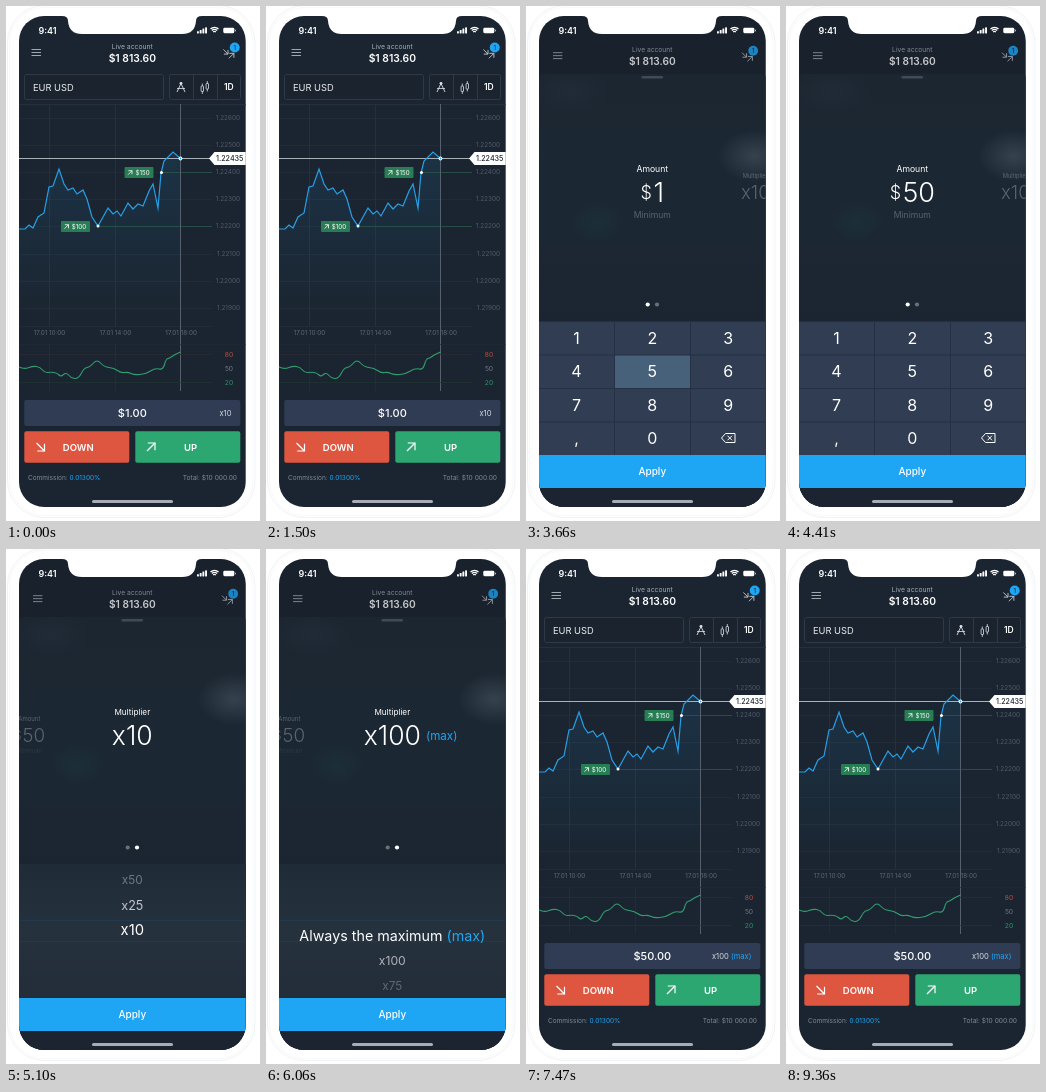
These frames come from a looping animation (254 by 515 pixels, 9.39 s). An HTML page with a canvas:

```html
<!DOCTYPE html>
<html lang="en">
<head>
<meta charset="utf-8">
<style>
html, body { margin: 0; width: 100%; height: 100%; overflow: hidden; background: #fff; }
canvas { display: block; width: 254px; height: 515px; }
</style>
</head>
<body>
<canvas id="stage"></canvas>
<script>
const LOOP = 9390, W = 254, H = 515, MID = 126.3;
const BLUE = '#1ea6f4', GREEN = '#2ca771', RED = '#de563f', GREY = '#7f8994', DIM = '#505b67';
const canvas = document.getElementById('stage');
const g = canvas.getContext('2d');
const ratio = window.devicePixelRatio || 1;
canvas.width = W * ratio;
canvas.height = H * ratio;

const PRICES = [[13,223],[19,223],[23,219],[27,222],[32,211],[38,207],[43,181],[47,180],[53,163],
  [58,178],[62,184],[67,182],[71,188],[77,184],[81,193],[86,211],[92,220],[97,211],[102,202],[107,208],
  [111,205],[115,210],[122,197],[127,203],[132,198],[137,200],[143,185],[147,178],[152,202],[155,167],
  [158,155],[167,146],[174.5,152.5]];
const WAVE = [[13,361],[19,363],[27,360],[34,361],[39,367],[45,366],[51,367],[55,371],[60,366],[66,373],
  [73,372],[78,362],[84,361],[91,353],[98,361],[108,362],[115,367],[122,366],[128,369],[140,368],[149,362],
  [157,364],[160,353],[164,352],[168,349],[174.5,346]];
const KEYS = ['1', '2', '3', '4', '5', '6', '7', '8', '9', ',', '0', ''];
const STEPS = ['x10', 'x25', 'x50', 'x75', 'x100', 'Always the maximum'];

const span = (t, a, b) => Math.min(1, Math.max(0, (t - a) / (b - a)));
const smooth = u => u * u * (3 - 2 * u);
const easeOut = u => 1 - (1 - u) ** 3;

function text(s, x, y, size, color = '#fff', weight = 400, align = 'center') {
  g.font = `${weight} ${size}px Inter, Roboto, sans-serif`;
  g.fillStyle = color;
  g.textAlign = align;
  g.textBaseline = 'alphabetic';
  g.fillText(s, x, y + size * 0.36);
  return g.measureText(s).width;
}

// Two-coloured run; x is the start, centre or end according to align.
function pair(a, b, x, y, size, colors, align = 'left', weight = 400) {
  g.font = `${weight} ${size}px Inter, Roboto, sans-serif`;
  const total = g.measureText(a + b).width;
  const left = x - total * { left: 0, center: 0.5, right: 1 }[align];
  const w = text(a, left, y, size, colors[0], weight, 'left');
  text(b, left + w, y, size, colors[1], weight, 'left');
}

function box(x, y, w, h, r, fill, stroke, width = 1) {
  g.beginPath();
  g.roundRect(x, y, w, h, r);
  if (fill) { g.fillStyle = fill; g.fill(); }
  if (stroke) { g.strokeStyle = stroke; g.lineWidth = width; g.stroke(); }
}

function dot(x, y, r, fill) {
  g.beginPath();
  g.arc(x, y, r, 0, 7);
  g.fillStyle = fill;
  g.fill();
}

function line(points, color, width = 1) {
  g.beginPath();
  points.forEach(([x, y]) => g.lineTo(x, y));
  g.strokeStyle = color;
  g.lineWidth = width;
  g.stroke();
}

function curve(points, color, width) {
  g.beginPath();
  g.moveTo(...points[0]);
  points.slice(1).forEach(([x, y], i) => {
    const [px, py] = points[i];
    g.quadraticCurveTo(px, py, (px + x) / 2, (py + y) / 2);
  });
  g.lineTo(...points.at(-1));
  g.strokeStyle = color;
  g.lineWidth = width;
  g.stroke();
}

// Diagonal arrow to the right with a wide corner head.
function arrow(x, y, size, down, color = '#fff', width = 1) {
  const s = down ? 1 : -1, h = size / 2;
  line([[x - h, y - s * h], [x + h, y + s * h]], color, width);
  line([[x + h, y - s * h * 0.8], [x + h, y + s * h], [x - h * 0.8, y + s * h]], color, width);
}

function header() {
  for (const y of [43.5, 46.5, 49.5]) line([[25.5, y], [35, y]], '#aeb6be', 0.9);
  text('Live account', MID, 40.5, 6.8, '#a4adb6');
  text('$1 813.60', MID, 52, 10.3, '#fff', 600);
  arrow(219.7, 45.8, 4.6, true, '#c8ced4', 0.9);
  arrow(225.4, 49.8, 5, false, '#c8ced4', 0.9);
  dot(228.7, 41.5, 5, BLUE);
  text('1', 228.7, 41.5, 6, '#12314a', 500);
}

function toolbar() {
  const edge = '#303a46', ink = '#dfe3e7';
  box(18.5, 68.5, 139, 25, 2, '#1a232e', edge);
  text('EUR USD', 27, 81.3, 9.3, '#e8ebee', 400, 'left');
  box(163.5, 68.5, 71, 25, 2, '#1a232e', edge);
  for (const x of [187.5, 211.5]) line([[x, 69], [x, 93]], edge);
  dot(175, 77.3, 1.4, ink);
  line([[171, 86], [175, 77.5], [179, 86]], ink, 0.9);
  line([[171, 82.5], [179, 82.5]], ink, 0.8);
  for (const [x, y] of [[196.3, 80], [201.3, 77.5]]) {
    box(x - 1.2, y, 2.4, 5.5, 0.5, null, ink, 0.8);
    line([[x, y - 2.5], [x, y]], ink, 0.8);
    line([[x, y + 5.5], [x, y + 8]], ink, 0.8);
  }
  text('1D', 222.8, 81.3, 8.5, '#fff', 600);
}

function deal(x, y, label) {
  box(x, y, 29, 11, 1, '#287d54');
  arrow(x + 5.5, y + 5.7, 4, false, '#fff', 0.8);
  text(label, x + 18, y + 5.6, 6.2);
}

function chart() {
  const grid = '#26303b';
  line([[13, 98.5], [240, 98.5]], grid);
  for (let i = 0; i < 8; i++) {
    const y = Math.round(112 + i * 27.1) + 0.5;
    line([[13, y], [206, y]], grid, 0.7);
    text((1.226 - i * 0.001).toFixed(5), 234, y - 0.5, 6.4, DIM, 400, 'right');
  }
  for (const x of [43.5, 109.5]) line([[x, 98], [x, 320]], grid);
  line([[13, 320.5], [206, 320.5]], grid, 0.7);

  const shade = g.createLinearGradient(0, 145, 0, 310);
  shade.addColorStop(0, 'rgba(30,130,190,.15)');
  shade.addColorStop(1, 'rgba(30,130,190,0)');
  g.beginPath();
  [...PRICES, [174.5, 320], [13, 320]].forEach(([x, y]) => g.lineTo(x, y));
  g.fillStyle = shade;
  g.fill();

  line([[92, 220.5], [206, 220.5]], '#28594a', 0.8);
  line([[155, 166.5], [206, 166.5]], '#28594a', 0.8);
  line([[174.5, 98], [174.5, 385]], '#56606c');
  line([[13, 152.5], [205, 152.5]], '#a9b1b9');
  line(PRICES, '#269fe7', 1.2);
  for (const [x, y] of [[92, 220], [155.5, 166.5]]) dot(x, y, 1.5, '#fff');
  dot(174.5, 152.5, 1.9, '#fff');
  dot(174.5, 152.5, 0.9, BLUE);
  deal(55, 215, '$100');
  deal(118.5, 161, '$150');

  g.beginPath();
  [[203, 152.5], [208.5, 146], [240, 146], [240, 159], [208.5, 159]].forEach(p => g.lineTo(...p));
  g.fillStyle = '#fff';
  g.fill();
  text('1.22435', 223.7, 152.7, 7.2, '#1b2531', 500);

  [10, 14, 18].forEach((h, i) => text(`17.01 ${h}:00`, 43.5 + i * 65.8, 327, 6.3, '#5c6773'));
  line([[13, 338.5], [240, 338.5]], '#202a35', 0.7);
  for (const x of [43.5, 109.5]) line([[x, 338], [x, 385]], grid, 0.7);
  line([[13, 348.5], [206, 348.5]], '#302b33', 0.7);
  line([[13, 376.5], [206, 376.5]], '#20352f', 0.7);
  curve(WAVE, '#2f9e6c', 1.1);
  text('80', 223, 348.5, 6.7, '#b94d40');
  text('50', 223, 362.3, 6.7, '#707b86');
  text('20', 223, 376.3, 6.7, '#2c9467');
}

function home(done) {
  header();
  toolbar();
  chart();
  box(18.3, 394, 216, 26, 2, '#303c53');
  text(done ? '$50.00' : '$1.00', MID, 407.2, 11, '#fff', 500);
  pair(done ? 'x100 ' : 'x10', done ? '(max)' : '', 225.5, 407, 7.6, ['#d6dbe1', BLUE], 'right');
  box(18.3, 425.3, 105, 31.4, 2, RED);
  box(129.3, 425.3, 105, 31.4, 2, GREEN);
  arrow(34.5, 441, 8, true, '#fff', 1.2);
  arrow(145, 441, 8, false, '#fff', 1.2);
  text('DOWN', 72.3, 441.2, 9.5, '#fff', 600);
  text('UP', 184.5, 441.2, 9.5, '#fff', 600);
  pair('Commission: ', '0.01300%', 22, 472, 6.5, [GREY, BLUE]);
  text('Total: $10 000.00', 231, 472, 6.6, GREY, 400, 'right');
}

function glow(x, y, rx, ry, color, alpha) {
  const grad = g.createRadialGradient(0, 0, 0, 0, 0, 1);
  grad.addColorStop(0, `rgba(${color},${alpha})`);
  grad.addColorStop(1, `rgba(${color},0)`);
  g.save();
  g.translate(x, y);
  g.scale(rx, ry);
  g.fillStyle = grad;
  g.fillRect(-1, -1, 2, 2);
  g.restore();
}

// Side pages shrink and fade while they move away from the middle.
function page(offset, draw) {
  const d = Math.min(1, Math.abs(offset)), s = 1 - 0.3 * d;
  g.save();
  g.globalAlpha *= 1 - 0.72 * d;
  g.translate(MID + offset * 103, 186);
  g.scale(s, s);
  draw();
  g.restore();
}

function amountPage(amount) {
  text('Amount', 0, -23, 8.6);
  g.font = '300 27px Inter, Roboto, sans-serif';
  const w = g.measureText(amount).width, left = -(w + 13) / 2;
  text('$', left, 0.5, 18, '#fff', 300, 'left');
  text(amount, left + 13, 0, 27, '#fff', 300, 'left');
  text('Minimum', 0, 22.5, 8.6, '#596470');
}

function multiplierPage(index) {
  text('Multiplier', 0, -23, 8.2);
  const w = text(STEPS[Math.min(index, 4)], 0, 0, 26.5, '#fff', 300);
  if (index === 5) text('(max)', w / 2 + 5, 0.5, 11.6, BLUE, 400, 'left');
}

function keypad(pressed) {
  g.fillStyle = '#303d52';
  g.fillRect(13, 315, 227, 134);
  KEYS.forEach((key, i) => {
    const col = i % 3, row = Math.floor(i / 3);
    const x = 50.5 + col * 75.8, y = 332 + row * 33.5;
    if (key && key === pressed) {
      g.fillStyle = '#47617a';
      g.fillRect(x - 37.5, y - 16.5, 75.5, 33);
    }
    if (key) text(key, x, y, 16, '#fff', 400);
  });
  for (let i = 0; i < 4; i++) line([[13, 315.5 + i * 33.5], [240, 315.5 + i * 33.5]], '#243044');
  for (const x of [88.5, 164.5]) line([[x, 315], [x, 449]], '#243044');
  line([[195.5, 432], [199.5, 427.5], [209, 427.5], [209, 436.5], [199.5, 436.5], [195.5, 432]], '#fff');
  line([[201.5, 429.7], [206, 434.3]], '#fff');
  line([[206, 429.7], [201.5, 434.3]], '#fff');
}

function picker(scroll) {
  const back = g.createLinearGradient(0, 315, 0, 449);
  [[0, '#202b38'], [0.5, '#26313e'], [1, '#232d3a']].forEach(s => back.addColorStop(...s));
  g.fillStyle = back;
  g.fillRect(13, 315, 227, 134);
  for (const y of [371.5, 392.5]) line([[13, y], [240, y]], '#21394f');
  g.save();
  g.beginPath();
  g.rect(13, 315, 227, 134);
  g.clip();
  const base = g.globalAlpha;
  STEPS.forEach((label, i) => {
    const y = 381 - 25 * i + scroll, d = Math.abs(y - 381);
    g.globalAlpha = base * Math.max(0, 1 - Math.max(0, d - 6) * 0.0145);
    const size = Math.max(11.8, 14.8 - d * 0.085);
    if (i === 5) pair(label, ' (max)', MID, y, size, ['#fff', BLUE], 'center');
    else text(label, MID, y, size);
  });
  g.restore();
}

function sheet(t, drop, panelDrop) {
  const swipe = smooth(span(t, 4480, 4960));
  const amount = t < 3720 ? '1' : t < 4110 ? '5' : '50';
  const pressed = t >= 3600 && t < 3780 ? '5' : t >= 4020 && t < 4200 ? '0' : '';
  const scroll = 137 * smooth(span(t, 5250, 5880)) - 12 * smooth(span(t, 5880, 6240));
  const index = Math.min(5, Math.round(scroll / 25));

  g.save();
  g.translate(0, drop);
  const back = g.createLinearGradient(0, 68, 0, 315);
  back.addColorStop(0, '#1c2631');
  back.addColorStop(0.5, '#1b2833');
  back.addColorStop(1, '#1b2531');
  box(13, 68, 227, 460, [4, 4, 0, 0], back);
  g.beginPath();
  g.rect(13, 68, 227, 460);
  g.clip();
  glow(228, 150, 36, 26, '105,118,130', 0.34);
  glow(71, 217, 28, 22, '35,95,85', 0.13);
  glow(45, 85, 40, 22, '55,70,84', 0.14);
  box(115.5, 70, 21.5, 2.4, 1.2, '#414b57');
  page(-swipe, () => amountPage(amount));
  page(1 - swipe, () => multiplierPage(index));
  dot(121.7, 298.5, 2.1, swipe < 0.5 ? '#fff' : '#66717c');
  dot(131, 298.5, 2.1, swipe < 0.5 ? '#66717c' : '#fff');
  g.restore();

  g.save();
  g.translate(0, panelDrop);
  if (swipe > 0) picker(scroll);
  g.globalAlpha = 1 - swipe;
  if (swipe < 1) keypad(pressed);
  g.globalAlpha = 1;
  g.fillStyle = BLUE;
  g.fillRect(13, 449, 227, 33);
  text('Apply', MID, 465, 10, '#fff', 500);
  g.fillStyle = '#1b2430';
  g.fillRect(13, 482, 227, 20);
  g.restore();
}

function statusBar() {
  text('9:41', 41.5, 24.3, 9, '#fff', 600);
  for (let i = 0; i < 4; i++) box(191 + i * 2.7, 25.2 - i * 1.3, 1.9, 2.2 + i * 1.3, 0.4, '#fff');
  for (const r of [2, 4, 6]) {
    g.beginPath();
    g.arc(208.5, 27.5, r, -2.3, -0.84);
    g.strokeStyle = '#fff';
    g.lineWidth = 1.3;
    g.stroke();
  }
  box(217.3, 21.8, 11, 5.4, 1.4, '#fff');
  box(229, 23.5, 0.9, 2, 0.4, '#c3c8cd');
}

function notch() {
  g.beginPath();
  g.moveTo(56, 9);
  g.lineTo(56, 10);
  g.quadraticCurveTo(62, 10, 62, 15);
  g.quadraticCurveTo(63, 28, 76, 28);
  g.lineTo(176, 28);
  g.quadraticCurveTo(189, 28, 190, 15);
  g.quadraticCurveTo(190, 10, 196, 10);
  g.lineTo(196, 9);
  g.fillStyle = '#fff';
  g.fill();
}

function draw(t) {
  g.setTransform(ratio, 0, 0, ratio, 0, 0);
  g.fillStyle = '#fff';
  g.fillRect(0, 0, W, H);
  box(1.5, -0.5, 247.5, 512, 37, '#fff', '#f0f3f5');
  box(3.5, 1.5, 243.5, 508, 35, '#fff', '#f7f9fa');

  const close = smooth(span(t, 6740, 7340));
  const open = easeOut(span(t, 2100, 2820)) * (1 - close);
  const panel = easeOut(span(t, 2150, 2870)) * (1 - close);
  const back = Math.min(1, open * 1.3);

  g.save();
  g.beginPath();
  g.roundRect(13, 10, 226.7, 491, 25);
  g.clip();
  g.fillStyle = '#1b2531';
  g.fillRect(0, 0, W, H);
  g.save();
  const s = 1 - 0.015 * back;
  g.translate(MID, 256);
  g.scale(s, s);
  g.translate(-MID, -256);
  home(t > 4110);
  g.restore();
  if (back > 0) {
    g.fillStyle = `rgba(18,24,33,${0.24 * back})`;
    g.fillRect(0, 0, W, H);
    sheet(t, 447 * (1 - open), 200 * (1 - panel));
  }
  box(86, 494, 81, 3, 1.5, '#a6adb6');
  g.restore();
  notch();
  statusBar();
}

const start = performance.now();
function tick() {
  draw((performance.now() - start) % LOOP);
  requestAnimationFrame(tick);
}
tick();
</script>
</body>
</html>
```
